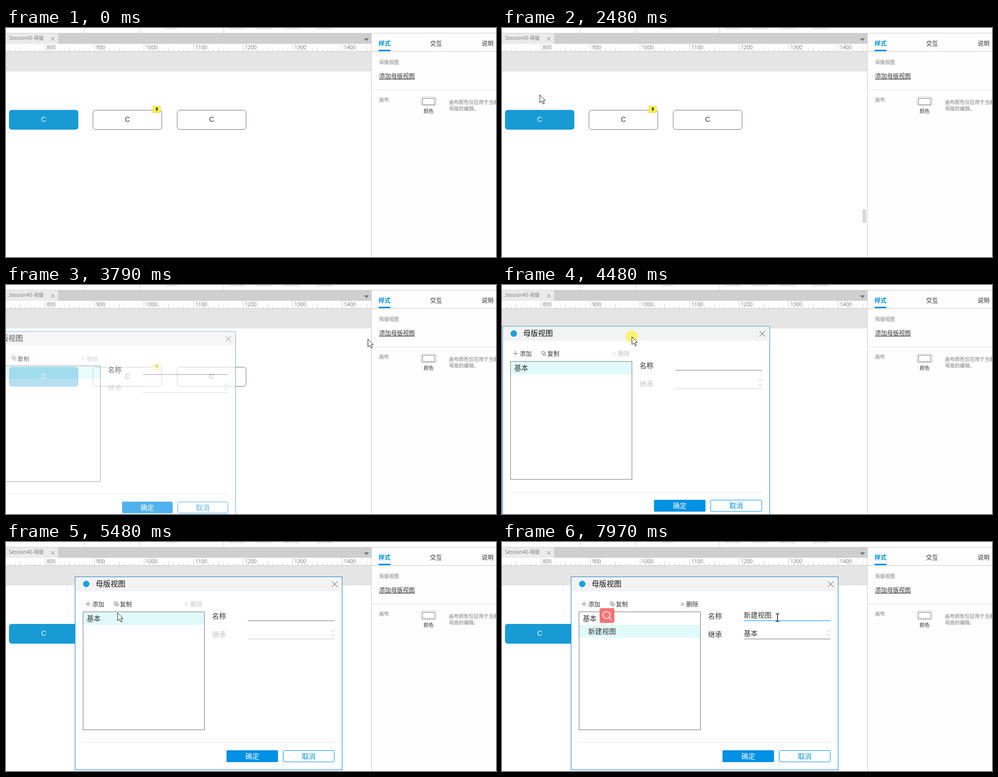
An HTML page that plays this animation: 989 px wide and 464 px high, repeating every 8 s.

```html
<!DOCTYPE html>
<html lang="zh-CN">
<head>
<meta charset="utf-8">
<title>母版视图</title>
<style>
  html, body { margin: 0; width: 100%; height: 100%; overflow: hidden; background: #fff; }
  svg { display: block; width: 989px; height: 464px; }
  text { font: 10px "Open Sans", "Noto Sans CJK SC", "Noto Sans CJK", sans-serif; fill: #333; white-space: pre; }
  .s12 { font-size: 12px; }
  .s14 { font-size: 14px; }
  .s15 { font-size: 15px; fill: #111; }
  .mid { text-anchor: middle; }
  .gray { fill: #7c7c7c; }
  .num { font-size: 10.5px; fill: #777; }
  .c { font: 14px "Liberation Sans", Arial, sans-serif; text-anchor: middle; }
  .line { fill: none; stroke: #ccc; }
  .dark { fill: none; stroke: #777; }
  text.off { fill: #c4c4c4; }
</style>
</head>
<body>
<svg viewBox="0 0 989 464">
  <defs><path id="cross" d="M-1-1L1 1M1-1L-1 1" vector-effect="non-scaling-stroke"/></defs>

  <!-- toolbar and tab strip -->
  <path class="line" stroke="#ddd" d="M158.5 0V10M269.5 0V10M439.5 0V10M0 10.5H989M323 1.5h22M449 1.5h33M504 1.5h33M559 1.5h33M627 1.5h33"/>
  <path fill="#cfcfcf" d="M0 11H738V32H0Z"/>
  <path fill="#ebebeb" d="M0 11H105V32H0Z"/>
  <text class="gray" x="6" y="24">Session40-母版</text>
  <use href="#cross" stroke="#777" transform="translate(94.5 22) scale(3.5)"/>
  <path fill="#777" d="M722.5 21h10l-5 5.5z"/>

  <!-- ruler and canvas -->
  <path id="ticks" class="line"/>
  <g id="labels"></g>
  <path class="line" d="M0 47.5H738"/>
  <path fill="#e5e5e5" d="M0 48H738V88H0Z"/>
  <g id="buttons"></g>
  <rect x="296.5" y="158.5" width="15" height="13" fill="#fbf344" stroke="#ddd56a"/>
  <path fill="#444" d="M303 161h4l-1.5 3h2l-4.500 6 1-4.500h-2.500z"/>
  <rect id="thumb" x="728" y="367" width="7" height="28" rx="2.500" fill="#d6d6d6"/>

  <!-- inspector -->
  <path fill="#fefefe" d="M738 11H989V464H738Z"/>
  <path class="line" d="M737.5 11V464M738 47.5H989"/>
  <path fill="none" stroke="#e2e2e2" d="M738 125.5H989"/>
  <path fill="#0090e0" d="M752 44h24v3h-24z"/>
  <text class="s12" x="752" y="36" style="fill:#0090e0;font-weight:bold">样式</text>
  <text class="s12" x="856" y="36">交互</text>
  <text class="s12" x="960" y="36">说明</text>
  <text class="gray" x="753" y="73">母版视图</text>
  <text class="s12" x="753" y="102" text-decoration="underline">添加母版视图</text>
  <text class="gray" x="753" y="149">画布</text>
  <rect x="837.5" y="139.5" width="31" height="18" rx="2" fill="#fff" stroke="#ccc"/>
  <rect class="dark" x="840.5" y="142.5" width="25" height="13"/>
  <text x="843" y="172">颜色</text>
  <text class="gray" x="894" y="154">画布颜色仅应用于当前</text>
  <text class="gray" x="894" y="167">母版的编辑。</text>

  <g id="dialog">
    <rect x=".5" y=".5" width="539" height="391" fill="#fff" stroke="#1a80c8"/>
    <path fill="#f3f3f3" d="M1 1H539V30H1Z"/>
    <circle cx="23" cy="15" r="6.5" fill="#1aa0dc"/>
    <text class="s15" x="42" y="20">母版视图</text>
    <use href="#cross" stroke="#444" transform="translate(524.5 15.5) scale(5.5)"/>
    <path class="dark" d="M21 55.5h11M26.5 50v11M79.5 51.5h5v5h-5zM84.5 54.5h3v5h-5v-3"/>
    <text class="s12" x="35" y="61">添加</text>
    <text class="s12" x="91" y="61">复制</text>
    <use id="delMark" href="#cross" transform="translate(225 56) scale(3.5)"/>
    <text id="delText" class="s12" x="233" y="61">删除</text>
    <path id="row" fill="#e0fafa" d="M17 0H261V26H17Z"/>
    <rect class="dark" x="16.5" y="71.5" width="245" height="239"/>
    <text class="s14" x="24" y="90">基本</text>
    <text class="s14" x="277" y="85">名称</text>
    <text id="parent" class="s14" x="277" y="122">继承</text>
    <path id="nameLine" fill="none" d="M349 89.5H524"/>
    <path id="parentLine" d="M349 126.5H524"/>
    <path fill="none" stroke="#bbb" d="M516.5 112l4-4 4 4m-8 5l4 4 4-4"/>
    <g id="added">
      <text class="s14" x="35" y="116">新建视图</text>
      <path id="mark" fill="#72b9ec" d="M349 69h56v18h-56z"/>
      <text class="s14" x="349" y="83">新建视图</text>
      <text class="s14" x="349" y="120">基本</text>
    </g>
    <path fill="none" stroke="#e0e0e0" d="M16 336.5H524"/>
    <rect x="306" y="352" width="104" height="24" rx="2" fill="#0090e4"/>
    <rect x="420.5" y="352.5" width="103" height="23" rx="2" fill="#fff" stroke="#0090e4"/>
    <text class="s14 mid" x="358" y="369" style="fill:#fff">确定</text>
    <text class="s14 mid" x="472" y="369" style="fill:#0090e4">取消</text>
  </g>

  <g id="search" fill="none" stroke="#fff" stroke-width="1.5">
    <rect x="197" y="134" width="30" height="30" rx="4" fill="#f57576" stroke="none"/>
    <circle cx="211" cy="148" r="7"/>
    <path d="M216 153l5 5"/>
  </g>

  <g id="pointer">
    <circle id="press" r="12" fill="#fff200" fill-opacity=".55"/>
    <path id="arrow" fill="#fff" stroke="#222" d="M.5.5V16.5L4.3 13 7 19 9.5 18 6.9 12H11.5Z"/>
    <path id="cross4" fill="#fffbb0" stroke="#444"/>
    <path id="beam" fill="none" stroke="#222" stroke-width="1.5" d="M-3.5-7.5H3.5M0-7.5V7.5M-3.5 7.5H3.5"/>
  </g>
</svg>
<script>
const $ = id => document.getElementById(id);
const set = (id, name, value) => $(id).setAttribute(name, value);
const show = (id, on) => $(id).style.display = on ? '' : 'none';
const clamp = v => Math.max(0, Math.min(1, v));

// ruler: a tick every 10 units, longer at 50 and 100
let ticks = '';
for (let u = 730; u < 1460; u += 10) {
  const top = u % 100 === 0 ? 32 : u % 50 === 0 ? 39 : 43;
  ticks += `M${u - 721.5} ${top}V47`;
  if (top === 32)
    $('labels').innerHTML += `<text class="num" x="${u - 718}" y="43">${u}</text>`;
}
set('ticks', 'd', ticks);

for (let i = 0; i < 3; i++) {
  const x = 6.5 + Math.floor(169.5 * i);
  const [fill, stroke, ink] = i ? ['#fff', '#777', '#333'] : ['#189bd5', '#189bd5', '#fff'];
  $('buttons').innerHTML +=
    `<rect id="button${i}" x="${x}" y="166.5" width="139" height="39" rx="5" fill="${fill}" stroke="${stroke}"/>
     <text class="c" x="${x + 69.5}" y="190" style="fill:${ink}">C</text>`;
}

// four-way arrow: one arm turned by quarter circles
let arm = [[-1.5, -1.5], [-1.5, -6], [-5, -6], [0, -11], [5, -6], [1.5, -6]];
const outline = [];
for (let i = 0; i < 4; i++) {
  outline.push(...arm);
  arm = arm.map(([x, y]) => [-y, x]);
}
set('cross4', 'd', `M${outline.join(' ')}Z`);

// pointer moves: start, end, x, y; it rests in between
const moves = [
  [610, 1090, 218, 228], [1240, 1530, 111, 179], [1770, 2470, 76, 135],
  [2620, 3320, 795, 94], [3630, 3780, 730, 109], [3860, 4250, 190, 111],
  [4320, 4780, 395, 92], [4860, 4940, 400, 91], [5090, 5400, 245, 148],
  [5400, 5710, 168, 129], [6340, 6341, 186, 142], [6420, 6490, 197, 179],
  [7190, 7340, 245, 188], [7510, 7960, 556, 153]
];
const presses = [[1540, 1770], [2540, 2620], [3470, 3630], [4320, 5090], [5870, 6340], [6720, 7020]];

function pointerAt(t) {
  let x = 759, y = 392;
  for (const [start, end, toX, toY] of moves) {
    const u = clamp((t - start) / (end - start));
    x += (toX - x) * u;
    y += (toY - y) * u;
  }
  return [x, y];
}

function draw(t) {
  const [x, y] = pointerAt(t);
  const onButton = t < 2400 && x > 6 && x < 146 && y > 166 && y < 206;
  const onInput = t > 7500 && x > 488 && y < 160;
  show('pointer', t >= 610);
  set('pointer', 'transform', `translate(${x} ${y})`);
  show('press', presses.some(([from, to]) => t >= from && t < to));
  show('cross4', onButton);
  show('beam', onInput);
  show('arrow', !onButton && !onInput);
  show('thumb', t > 690 && t < 3350 && x < 738);

  const active = onButton || (t > 1540 && t < 2400);
  set('button0', 'rx', active ? 2 : 5);
  set('button0', 'stroke', active ? '#c6d62c' : '#189bd5');

  // the window fades in, then follows the pointer while dragged
  const a = clamp((t - 3640) / 220);
  const s = 0.94 + 0.06 * a;
  const [gx, gy] = pointerAt(Math.max(4320, Math.min(4940, t)));
  show('dialog', a > 0);
  set('dialog', 'opacity', a);
  set('dialog', 'transform',
    `translate(${gx - 261 + 270 * (1 - s)} ${gy - 21 + 196 * (1 - s)}) scale(${s})`);

  const added = t >= 5940;
  show('added', added);
  show('mark', t < 6720);
  set('row', 'transform', `translate(0 ${added ? 98 : 72})`);
  set('delMark', 'stroke', added ? '#777' : '#ccc');
  $('delText').classList.toggle('off', !added);
  $('parent').classList.toggle('off', !added);
  set('nameLine', 'stroke', onInput ? '#0090e4' : '#777');
  set('parentLine', 'class', added ? 'dark' : 'line');
  show('search', t >= 7020);
}

function frame() {
  draw(performance.now() % 8000);
  requestAnimationFrame(frame);
}
frame();
</script>
</body>
</html>
```
